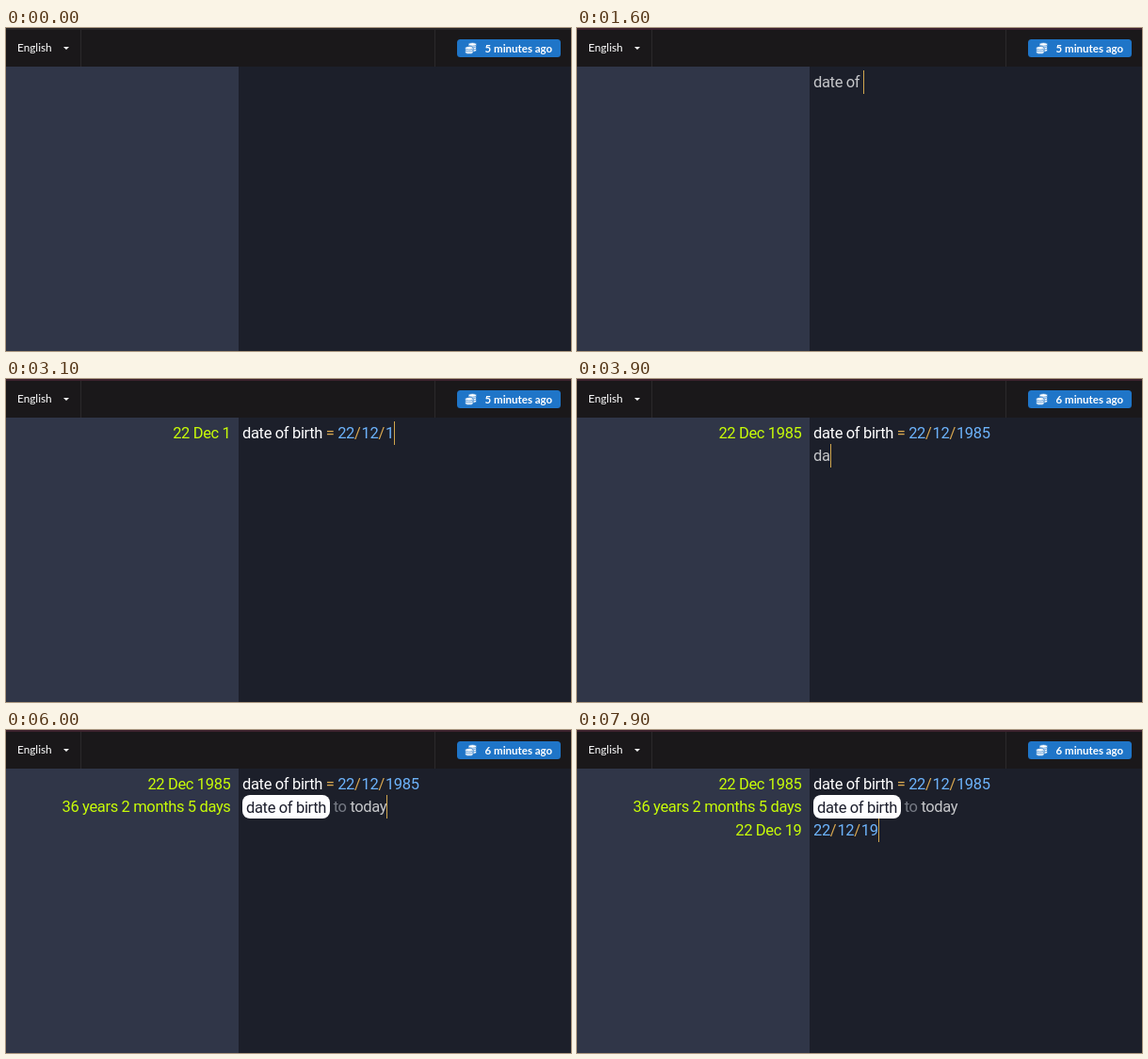
An HTML page for the animation above (8 s loop, 600 by 343 pixels).

```html
<!DOCTYPE html>
<html lang="en">
<head>
<meta charset="utf-8">
<title>Notepad calculator</title>
<style>
  html, body { margin: 0; width: 100%; height: 100%; overflow: hidden; background: #1c1f2a; }
  #stage { position: relative; width: 600px; height: 343px; overflow: hidden; background: #1c1f2a; }
  #stage > * { position: absolute; }
  #side { left: 0; top: 41px; width: 246.6px; height: 302px; background: #303648; }
  #bar { left: 0; top: 0; width: 600px; height: 41px; background: #1a181a; color: #fff; font-family: Lato, sans-serif; }
  #bar > * { position: absolute; }
  #edge { left: 0; top: 0; width: 600px; height: 2px; }
  .rule { top: 2px; width: 1px; height: 39px; background: #2b292b; }
  #lang { left: 12px; top: 12px; font-size: 11.8px; line-height: 18px; }
  #caret { left: 60.5px; top: 20px; border: 3.5px solid transparent; border-top-color: #fff; border-bottom: 0; }
  #rates { left: 479.4px; top: 12px; width: 109.8px; height: 18.6px; border-radius: 3.5px; background: #1f75c8; }
  #rates svg { position: absolute; left: 8px; top: 3px; }
  #ago { position: absolute; left: 29.2px; top: 0; font-size: 11.5px; font-weight: 700; line-height: 19px; white-space: nowrap; }
  .row { height: 24.6px; font: 16.5px/24.6px Roboto, sans-serif; white-space: pre; }
  .code { left: 251px; letter-spacing: -.35px; color: #c6c7ca; }
  .result { right: 361.5px; letter-spacing: -.36px; color: #c8fc08; }
  .name { color: #fff; }
  .num { color: #6db3fb; }
  .op { color: #d9a850; }
  .slash { letter-spacing: .7px; }
  .word { color: #767a84; }
  .pill { padding: 3.5px 4px 2.3px; border-radius: 8px; background: #fdfdff; color: #1b1d2c; }
  .cursor { position: absolute; width: 1.2px; height: 25px; margin-top: -1.1px; background: #d0a64e; }
  .pill .cursor { background: #e6e08a; }
</style>
</head>
<body>
<div id="stage">
  <div id="side"></div>
  <div id="bar">
    <div id="edge"></div>
    <div class="rule" style="left:79px"></div>
    <div class="rule" style="left:455px"></div>
    <div id="lang">English</div>
    <div id="caret"></div>
    <div id="rates">
      <svg width="14" height="13" viewBox="0 0 14 13">
        <g fill="#fff" stroke="#1f75c8" stroke-width=".7">
          <path d="M4.2 2.4v6.4c0 2 8.3 2 8.3 0v-6.4z"/>
          <path d="M4.2 4.3c0 2 8.3 2 8.3 0M4.2 6.5c0 2 8.3 2 8.3 0" fill="none"/>
          <ellipse cx="8.35" cy="2.4" rx="4.2" ry="1.8"/>
          <path d="M.7 6.3v4.6c0 2 8.3 2 8.3 0v-4.6z"/>
          <path d="M.7 8.5c0 2 8.3 2 8.3 0" fill="none"/>
          <ellipse cx="4.85" cy="6.3" rx="4.2" ry="1.8"/>
        </g>
      </svg>
      <span id="ago"></span>
    </div>
  </div>
</div>
<script>
const LOOP = 8000;
const NAME = 'date of birth';

// [start, ms per key, keys]
const TYPING = [
  [1000, 80, NAME + ' = '],
  [2270, 130, '22/12/1985'],
  [3650, 100, '\n'],
  [3790, 100, NAME],
  [5090, 80, ' to today'],
  [6050, 100, '\n'],
  [6290, 100, '22/12/2022\b\b\b\b19'],
];
const keys = TYPING.flatMap(([start, gap, text]) =>
  [...text].map((key, i) => [start + i * gap, key]));

// [time, opacity] of the cursor while idle
const BLINK = [[0, 0], [100, .4], [200, 1], [500, .5], [600, 0], [800, 1]];

const $ = id => document.getElementById(id);
const span = (cls, text) => `<span class="${cls}">${text}</span>`;

function addRow(cls, i) {
  const el = document.createElement('div');
  el.className = 'row ' + cls;
  el.style.top = 45.65 + i * 24.8 + 'px';
  $('stage').append(el);
  return el;
}
const rows = [0, 1, 2].map(i => ({ code: addRow('code', i), result: addRow('result', i) }));

function typedAt(t) {
  let text = '';
  for (const [time, key] of keys) {
    if (time > t) break;
    text = key === '\b' ? text.slice(0, -1) : text + key;
  }
  return text;
}

function evaluate(line, i) {
  if (i === 1 && line.startsWith(NAME))
    return line.endsWith('today') ? '36 years 2 months 5 days' : '22 Dec 1985';
  const [day, month, year] = line.split('= ').pop().split('/');
  if (!/^\d/.test(day)) return '';
  if (year) return `${day} Dec ${year}`;
  return String(+(day / (month || 1)).toFixed(3));
}

const maths = text => text.replace(/\d+|\//g, s => s === '/' ? span('op slash', s) : span('num', s));

function highlight(line, i, cursor) {
  if (line.includes('=')) {
    const [left, right] = line.split('=');
    return span('name', left) + span('op', '=') + maths(right) + cursor;
  }
  if (i === 1 && line.startsWith(NAME)) {
    const rest = line.slice(NAME.length);
    if (!rest) return span('pill', NAME + cursor);
    return span('pill', NAME) + rest.replace(/^ to\b/, s => span('word', s)) + cursor;
  }
  return maths(line) + cursor;
}

let shown = null;
function render(text) {
  if (text === shown) return;
  shown = text;
  const lines = text.split('\n');
  rows.forEach(({ code, result }, i) => {
    const line = lines[i] || '';
    const cursor = i === lines.length - 1 ? '<i class="cursor"></i>' : '';
    code.innerHTML = highlight(line, i, cursor);
    result.textContent = evaluate(line, i);
  });
}

function draw() {
  const t = performance.now() % LOOP;
  render(typedAt(t));
  document.querySelector('.cursor').style.opacity = BLINK.filter(b => b[0] <= t).pop()[1];
  const warm = Math.min(1, t / 300);
  $('edge').style.background = `rgb(${40 + 20 * warm}, ${37 - 3 * warm}, ${39 + 6 * warm})`;
  $('ago').textContent = (t < 3800 ? 5 : 6) + ' minutes ago';
  requestAnimationFrame(draw);
}
draw();
</script>
</body>
</html>
```
